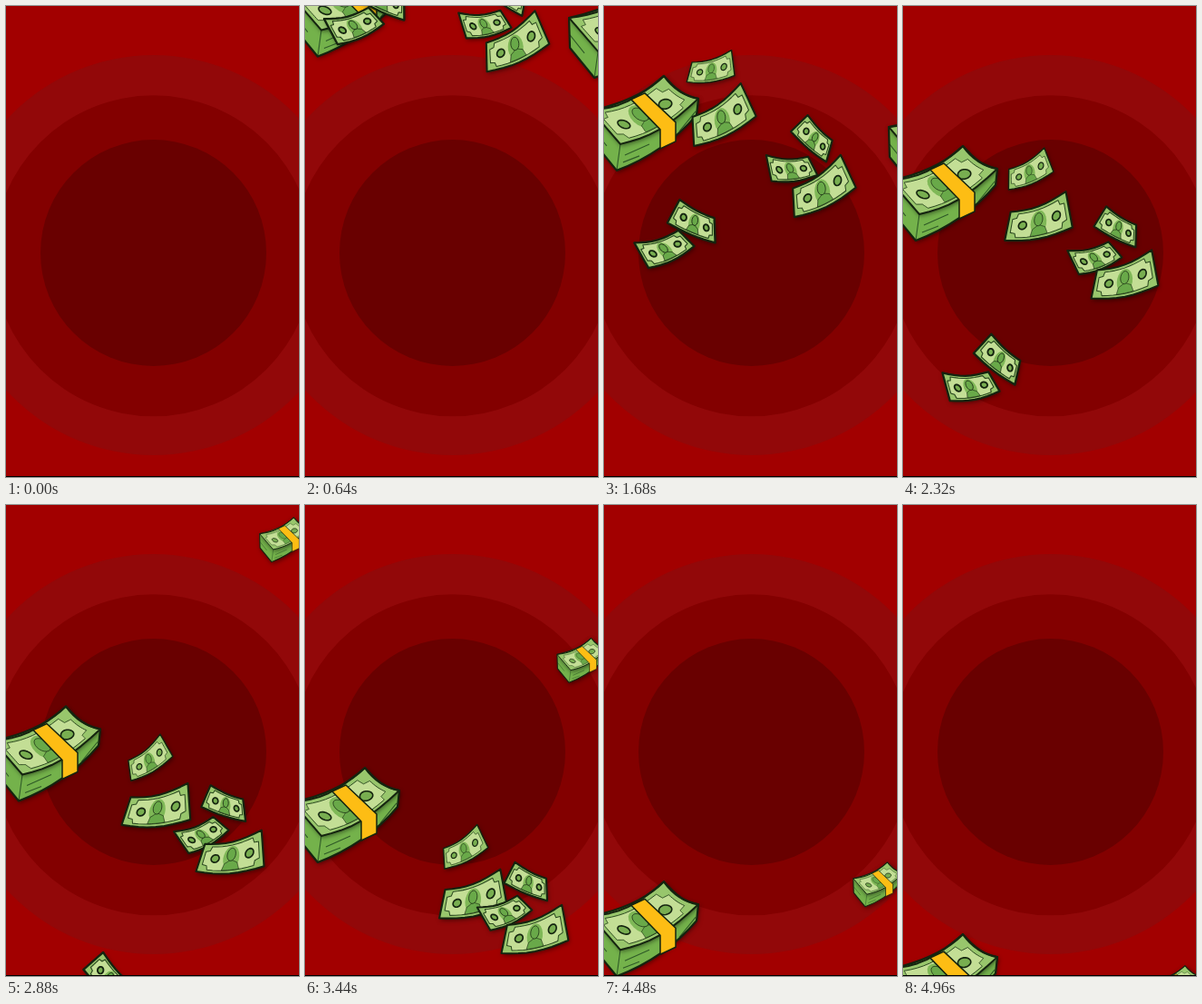
An HTML page with a canvas that plays this animation: 323 by 518 pixels, repeating every 5040 ms.

```html
<!DOCTYPE html>
<html lang="en">
<head>
<meta charset="utf-8">
<title>Falling banknotes</title>
<style>
  html, body { margin: 0; width: 323px; height: 518px; overflow: hidden; background: #a20000; }
  canvas { display: block; }
</style>
</head>
<body>
<canvas id="stage" width="323" height="518"></canvas>
<script>
const ctx = document.getElementById('stage').getContext('2d');
const W = 323, H = 518, LOOP = 5040, STEP = 80, MID = 2320, SWING = 3360;
const INK = '#14240f', EDGE = '#98c66c', PAPER = '#c3de95', DEEP = '#69a949', SIDE = '#74b24b';

// Bent sheets: corners run clockwise from the top left
const WIDE  = { c: [[-29, -7], [30, -27], [36, 11], [-36, 23]], bend: 5, tilt: -8 };
const FAN   = { c: [[-26, -13], [18, -12], [28, 7], [-20, 14]], bend: 3.5, tilt: -9 };
const SLANT = { c: [[-11, -21], [19, 0], [17, 23], [-25, -1]], bend: 2, tilt: 1 };
const TOP   = { c: [[-59, -13], [21, -51], [59, -26], [-27, 24]], bend: 9, side: 5 };

// Times at which a note is turned furthest clockwise
const LATE = 2880, EARLY = 1300;

// Places are those at MID, speeds in px per ms
const stacks = [
  { x: 45, y: 205, vx: 0, vy: .1205, size: 1 },
  { x: 387, y: 220, vx: .022, vy: .1155, size: 1 },
  { x: 309, y: -95, vx: -.003, vy: .237, size: .47 }
];
const flocks = [
  { vx: .012, vy: .236, notes: [[SLANT, 1.18, 107, 387, LATE], [FAN, 1.15, 74, 417, LATE]] },
  { vx: .032, vy: .1755, notes: [[WIDE, .73, 138.5, 180, EARLY], [WIDE, 1.04, 149, 233, LATE]] },
  { vx: .008, vy: .153, notes: [[FAN, 1.05, 211, 276, EARLY], [SLANT, 1.06, 237, 242, EARLY],
                                [WIDE, 1.03, 244, 297, LATE]] }
];

// Maps u, v in 0..1 onto a sheet
function sheet({ c, bend, side = 0 }) {
  const mix = (k, u, v) =>
    (c[0][k] * (1 - u) + c[1][k] * u) * (1 - v) + (c[3][k] * (1 - u) + c[2][k] * u) * v;
  return (u, v) => [
    mix(0, u, v),
    mix(1, u, v) + bend * Math.sin(Math.PI * u) + side * u * Math.sin(Math.PI * v)
  ];
}

function trace(map, pts) {
  const path = new Path2D();
  pts.forEach(([u, v], i) => {
    const [u2, v2] = pts[(i + 1) % pts.length];
    for (let k = 0; k < 8; k++) path.lineTo(...map(u + (u2 - u) * k / 8, v + (v2 - v) * k / 8));
  });
  path.closePath();
  return path;
}

function ring(map, u, v, ru, rv) {
  const path = new Path2D();
  for (let a = 0; a < 20; a++) {
    const q = a * Math.PI / 10;
    path.lineTo(...map(u + ru * Math.cos(q), v + rv * Math.sin(q)));
  }
  path.closePath();
  return path;
}

// Repeats a run of points in all four corners
function mirrored(run) {
  const back = [...run].reverse();
  return [
    ...run,
    ...back.map(([u, v]) => [1 - u, v]),
    ...run.map(([u, v]) => [1 - u, 1 - v]),
    ...back.map(([u, v]) => [u, 1 - v])
  ];
}

const BORDER = mirrored([[0, 0]]);
const PANEL = mirrored([[.06, .27], [.13, .24], [.15, .1]]);
const BUST = [[.37, .89], [.4, .68], [.5, .56], [.6, .68], [.63, .89]];

function paint(path, fill, width, ink = INK) {
  if (fill) { ctx.fillStyle = fill; ctx.fill(path); }
  if (width) { ctx.strokeStyle = ink; ctx.lineWidth = width; ctx.stroke(path); }
}

function castShadow(path, fill) {
  ctx.save();
  ctx.shadowColor = 'rgba(0,0,0,.5)';
  ctx.shadowBlur = 5;
  ctx.shadowOffsetX = 1;
  ctx.shadowOffsetY = 2;
  paint(path, fill);
  ctx.restore();
}

function note(shape) {
  const map = sheet(shape), edge = trace(map, BORDER);
  castShadow(edge, EDGE);
  paint(trace(map, PANEL), PAPER, 1, '#2c4a20');
  paint(ring(map, .5, .5, .13, .37), '#7fb857');
  paint(trace(map, BUST), DEEP, .6);
  paint(ring(map, .5, .4, .07, .2), DEEP, .7);
  for (const u of [.24, .79]) paint(ring(map, u, .5, .065, .13), '#78ae50', 1.6);
  paint(edge, null, 2);
}

const BLOCK = new Path2D('M-59-13Q-6-24 21-51Q36-30 59-26L57-8Q22 33-31 53L-58 20Z');
const SEAMS = new Path2D('M-27 24L-31 53M-58 6L-42 26M-22 36L5 24M38 10L56-12M-24 44L-6 37');
const BAND = new Path2D('M-15-25L0-32L34 0L34 21L17 29L17 8Z');

function stack() {
  castShadow(BLOCK, SIDE);
  paint(SEAMS, null, 1.1, '#2f5a27');
  note(TOP);
  paint(BLOCK, null, 2.2);
  paint(BAND, '#fdbd14', 1.5);
}

function place(x, y, size, turn, shape) {
  ctx.save();
  ctx.translate(x, y);
  ctx.rotate(turn * Math.PI / 180);
  ctx.scale(size, size);
  if (shape) note(shape); else stack();
  ctx.restore();
}

function disc(y, r, fill) {
  ctx.fillStyle = fill;
  ctx.beginPath();
  ctx.arc(162.5, y, r, 0, 7);
  ctx.fill();
}

function draw(t) {
  const d = t - MID;
  ctx.lineJoin = 'round';
  ctx.fillStyle = '#a20000';
  ctx.fillRect(0, 0, W, H);
  disc(274, 220, '#920809');
  disc(274.8, 176.5, '#830000');
  disc(271.5, 124.5, '#690000');

  if (t >= 2 * STEP) {
    for (const { x, y, vx, vy, size } of stacks) place(x + vx * d, y + vy * d, size, 0);
    for (const { vx, vy, notes } of flocks) {
      for (const [shape, size, x, y, peak] of notes) {
        const turn = shape.tilt + 13 * Math.cos(2 * Math.PI * (t - peak) / SWING);
        place(x + vx * d, y + vy * d, size, turn, shape);
      }
    }
  }

  ctx.fillStyle = '#000';
  ctx.fillRect(0, H - 1, W, 1);
}

const start = performance.now();
function tick() {
  const t = (performance.now() - start) % LOOP;
  draw(Math.floor(t / STEP) * STEP);
  requestAnimationFrame(tick);
}
tick();
</script>
</body>
</html>
```
